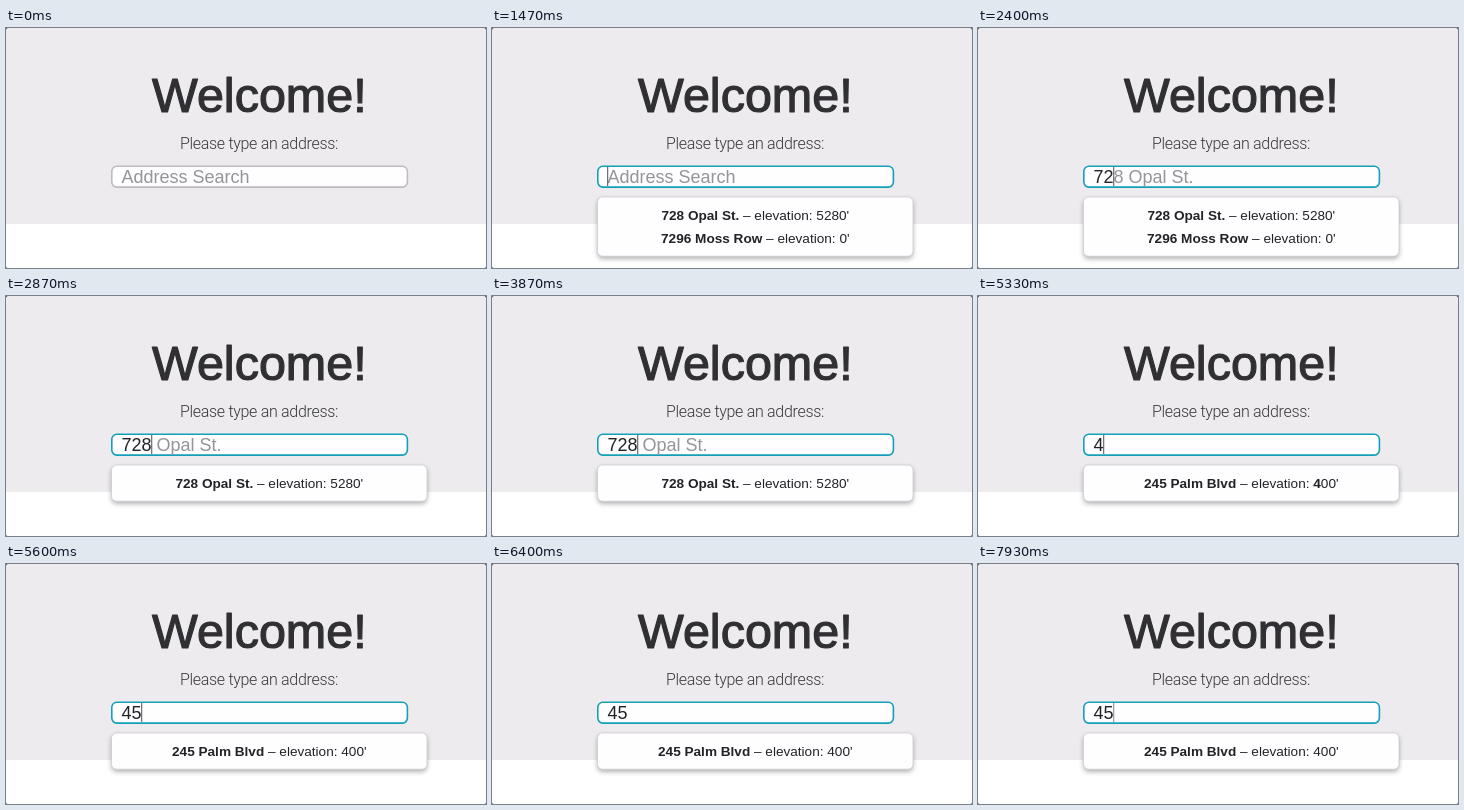
Recreate the animation shown at these times as an HTML page with a canvas. Size 480x240 px, loop 8000 ms.

```html
<!DOCTYPE html>
<html lang="en">
<head>
<meta charset="utf-8">
<title>Address search</title>
<style>
  html, body { margin: 0; width: 100%; height: 100%; overflow: hidden; background: #222; }
  canvas { display: block; width: 480px; height: 240px; }
</style>
</head>
<body>
<canvas id="stage"></canvas>
<script>
const W = 480, H = 240, LOOP = 8000;
const SANS = '"Liberation Sans", Arial, sans-serif';
const LIGHT = 'Roboto, "Liberation Sans", sans-serif';
const INK = '#232326';

const places = [
  { name: '728 Opal St.', elevation: "5280'" },
  { name: '7296 Moss Row', elevation: "0'" },
  { name: '245 Palm Blvd', elevation: "400'" }
];

// What the search field holds from each moment on; null means not focused.
const steps = [
  { at: 0, query: null },
  { at: 1470, query: '' },
  { at: 2130, query: '7' },
  { at: 2330, query: '72' },
  { at: 2730, query: '728' },
  { at: 4400, query: '' },
  { at: 5000, query: '4' },
  { at: 5400, query: '45' }
];

const canvas = document.getElementById('stage');
const ctx = canvas.getContext('2d');
const dpr = window.devicePixelRatio || 1;
canvas.width = W * dpr;
canvas.height = H * dpr;

function text(str, x, y, font, color) {
  ctx.font = font;
  ctx.fillStyle = color;
  ctx.fillText(str, x, y);
  return x + ctx.measureText(str).width;
}

function roundBox(x, y, w, h, r) {
  ctx.beginPath();
  ctx.roundRect(x, y, w, h, r);
}

function search(query) {
  return places
    .filter(p => p.name.includes(query) || p.elevation.includes(query))
    .slice(0, 2);
}

// The caret stays on after a key press, then fades out once a second.
function caretAlpha(age) {
  if (age < 470) return 1;
  const u = (age - 470) % 1000;
  if (u < 200) return 1 - u / 200;
  return u < 650 ? 0 : 1;
}

function drawPage() {
  ctx.fillStyle = '#edebee';
  ctx.fillRect(0, 0, W, H);
  ctx.fillStyle = '#fff';
  ctx.fillRect(0, 196, W, H - 196);

  text('Welcome!', 146, 84.2, '48.5px ' + SANS, '#302f33');
  ctx.strokeStyle = '#302f33';
  ctx.lineWidth = 1.2;
  ctx.lineJoin = 'round';
  ctx.strokeText('Welcome!', 146, 84.2);

  ctx.textAlign = 'center';
  ctx.letterSpacing = '-0.3px';
  text('Please type an address:', 253, 121, '300 16px ' + LIGHT, '#38373b');
  ctx.letterSpacing = '0px';
  ctx.textAlign = 'left';
}

function drawField(query, age, matches) {
  const focused = query !== null;
  const typed = query || '';
  const font = '18px ' + SANS;

  roundBox(105.8, 138.3, 295.6, 20.8, 5);
  ctx.fillStyle = '#fefdff';
  ctx.fill();
  ctx.strokeStyle = focused ? '#129fba' : '#bdbbbe';
  ctx.lineWidth = 1.6;
  ctx.stroke();

  const end = text(typed, 115.5, 155, font, INK);
  let hint = '';
  if (!typed) hint = 'Address Search';
  else if (matches[0].name.startsWith(typed)) hint = matches[0].name.slice(typed.length);
  text(hint, end, 155, font, '#969498');

  if (focused) {
    ctx.globalAlpha = caretAlpha(age);
    ctx.fillStyle = '#504f53';
    ctx.fillRect(end - 0.3, 139, 1, 19);
    ctx.globalAlpha = 1;
  }
}

function drawRow(place, query, y) {
  const plain = '13.6px ' + SANS, bold = 'bold ' + plain;
  const runs = [[place.name, bold], [' – elevation: ', plain]];
  const hit = query ? place.elevation.indexOf(query) : -1;
  if (hit < 0) {
    runs.push([place.elevation, plain]);
  } else {
    const stop = hit + query.length;
    runs.push([place.elevation.slice(0, hit), plain], [query, bold],
      [place.elevation.slice(stop), plain]);
  }
  const total = runs.reduce((sum, [str, font]) => {
    ctx.font = font;
    return sum + ctx.measureText(str).width;
  }, 0);
  let x = 263.3 - total / 2;
  for (const [str, font] of runs) x = text(str, x, y, font, INK);
}

function drawList(query, matches) {
  const h = 14 + 23 * matches.length;
  ctx.save();
  ctx.shadowColor = 'rgba(0, 0, 0, 0.32)';
  ctx.shadowBlur = 5 * dpr;
  ctx.shadowOffsetY = 2.5 * dpr;
  roundBox(105.5, 169, 315.5, h - 0.8, 5);
  ctx.fillStyle = '#fefdff';
  ctx.fill();
  ctx.restore();
  ctx.strokeStyle = '#cfcdd0';
  ctx.lineWidth = 0.8;
  ctx.stroke();
  matches.forEach((place, i) => drawRow(place, query, 192 + 23 * i));
}

function draw(t) {
  const step = steps.findLast(s => s.at <= t);
  const matches = search(step.query || '');
  ctx.setTransform(dpr, 0, 0, dpr, 0, 0);
  ctx.clearRect(0, 0, W, H);
  ctx.save();
  roundBox(0, 0, W, H, 2);
  ctx.clip();
  drawPage();
  drawField(step.query, t - step.at, matches);
  if (step.query !== null) drawList(step.query, matches);
  ctx.restore();
}

const start = performance.now();
function tick() {
  draw((performance.now() - start) % LOOP);
  requestAnimationFrame(tick);
}
tick();
</script>
</body>
</html>
```
